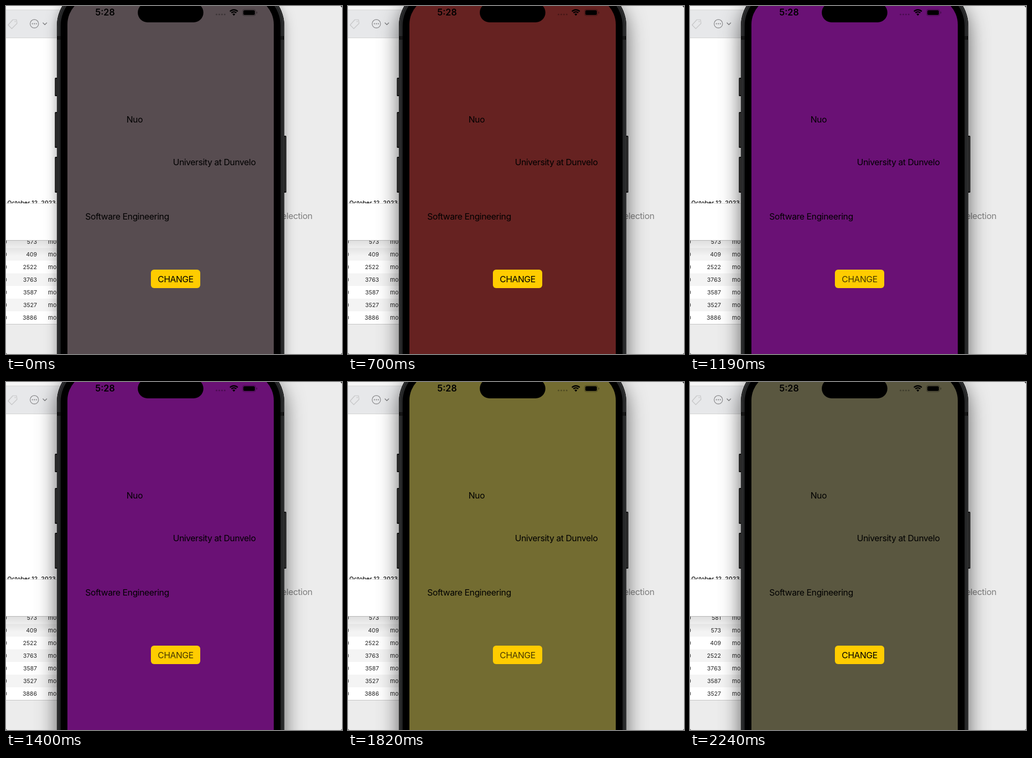
These frames come from a looping animation (640x660 px, 3220 ms). An HTML page with a canvas:

```html
<!DOCTYPE html>
<html lang="en">
<head>
<meta charset="utf-8">
<style>
  html, body { margin: 0; width: 100%; height: 100%; overflow: hidden; }
  canvas { display: block; width: 640px; height: 660px; }
</style>
</head>
<body>
<canvas id="stage" width="640" height="660"></canvas>
<script>
const ctx = document.getElementById('stage').getContext('2d');
const LOOP = 3220, STEP = 70, FADE = 140;
const FOCUS_AT = 420, ROW_ADDED_AT = 1890;
const FIRST_COLOR = '#574c50';
const PRESSED_ALPHA = 0.72;
const FONT = 'Inter, sans-serif';

// Each tap dims the button label; letting go picks a new background.
const taps = [
  { press: 420, release: 490, color: '#662221' },
  { press: 770, release: 840, color: '#6c6825' },
  { press: 1120, release: 1190, color: '#6a1175' },
  { press: 1400, release: 1470, color: '#261721' },
  { press: 1680, release: 1820, color: '#736c31' },
  { press: 1960, release: 2100, color: '#5a5740' }
];
const counts = [581, 573, 409, 2522, 3763, 3587, 3527, 3886];

function rect(x, y, w, h, fill) {
  ctx.fillStyle = fill;
  ctx.fillRect(x, y, w, h);
}

function roundRect(x, y, w, h, r, fill) {
  ctx.beginPath();
  ctx.roundRect(x, y, w, h, r);
  ctx.fillStyle = fill;
  ctx.fill();
}

function label(str, x, y, { size = 16.5, weight = 400, color = '#000', align = 'left', spacing = -0.4 } = {}) {
  ctx.font = `${weight} ${size}px ${FONT}`;
  ctx.letterSpacing = spacing + 'px';
  ctx.textAlign = align;
  ctx.fillStyle = color;
  ctx.fillText(str, x, y);
}

function line(points, color, width) {
  ctx.beginPath();
  points.forEach(([x, y]) => ctx.lineTo(x, y));
  ctx.strokeStyle = color;
  ctx.lineWidth = width;
  ctx.stroke();
}

function circle(x, y, r, fill) {
  ctx.beginPath();
  ctx.arc(x, y, r, 0, Math.PI * 2);
  ctx.fillStyle = fill;
  ctx.fill();
}

function drawToolbar() {
  rect(0, 0, 120, 8, '#f6f6f6');
  rect(0, 7, 120, 1, '#d9d9d9');
  rect(0, 8, 120, 52, '#e7e8ea');
  rect(0, 60, 120, 1, '#d2d2d2');

  ctx.lineJoin = ctx.lineCap = 'round';
  ctx.beginPath();
  ctx.moveTo(13, 26);
  ctx.lineTo(20, 26);
  ctx.lineTo(21, 33);
  ctx.lineTo(11, 43);
  ctx.lineTo(4, 36);
  ctx.closePath();
  ctx.strokeStyle = '#c6c6c7';
  ctx.lineWidth = 1.2;
  ctx.stroke();
  circle(17.5, 29.5, 1.1, '#c6c6c7');

  ctx.beginPath();
  ctx.arc(54, 33.7, 8, 0, Math.PI * 2);
  ctx.strokeStyle = '#858587';
  ctx.lineWidth = 1.2;
  ctx.stroke();
  for (const x of [50.3, 54, 57.7]) circle(x, 33.7, 1.1, '#858587');
  line([[70.5, 32], [74, 35.5], [77.5, 32]], '#858587', 1.6);
}

function drawTable(firstRow) {
  rect(0, 444, 120, 159, '#fff');
  for (let i = 0; i < 7; i++) {
    const y = 435 + i * 24;
    const style = { size: 11, spacing: 0, color: '#262626' };
    if (i % 2) rect(0, y, 120, 24, '#f4f4f4');
    label('0', 2, y + 16, { ...style, align: 'right' });
    label(counts[firstRow + i], 59, y + 16, { ...style, align: 'right' });
    label('mor27', 80, y + 16, style);
  }
  const shade = ctx.createLinearGradient(0, 444, 0, 474);
  shade.addColorStop(0, 'rgba(0,0,0,0.13)');
  shade.addColorStop(1, 'rgba(0,0,0,0)');
  rect(0, 444, 120, 30, shade);
  rect(0, 603, 120, 1, '#c4c4c4');
}

function drawDesktop(t) {
  rect(0, 0, 640, 660, '#ececec');
  rect(0, 61, 120, 383, '#fff');
  drawToolbar();
  label('October 12, 2023', 2.5, 377, { size: 11, weight: 500, spacing: 0.1 });
  drawTable(t < ROW_ADDED_AT ? 1 : 0);
  rect(0, 374, 120, 70, '#fff');
  rect(0, 374, 120, 1, '#dedede');
  rect(0, 444, 120, 1, '#b4b4b4');
  label('No Selection', 583.5, 404, { color: '#7f7f7f', align: 'right' });
}

function drawBody(focused) {
  ctx.save();
  ctx.shadowColor = focused ? 'rgba(0,0,0,0.6)' : 'rgba(0,0,0,0.38)';
  ctx.shadowBlur = focused ? 38 : 21;
  ctx.shadowOffsetY = focused ? 16 : 8;
  roundRect(97, -37, 433, 892, 75, '#000');
  ctx.restore();

  const buttons = [[93, 136, 35], [93, 201, 68], [93, 286, 68], [529, 246, 108]];
  for (const [x, y, h] of buttons) {
    roundRect(x, y, 5, h, 1.5, '#111');
    rect(x + 1, y + 2, 3, h - 4, '#303030');
  }
  roundRect(97, -37, 433, 892, 75, '#080808');
  roundRect(98, -36, 431, 890, 74, '#48494a');
  roundRect(99, -35, 429, 888, 73, '#252627');
  for (const x of [98, 523]) rect(x, 57, 6, 7, '#151515');
  roundRect(104, -30, 419, 878, 68, '#000');
}

function drawStatusBar() {
  label('5:28', 170, 18, { size: 17, weight: 600, spacing: 0 });
  roundRect(251, -6, 125, 37, 18.5, '#000');
  for (let i = 0; i < 4; i++) circle(401 + i * 5.2, 16, 1.6, 'rgba(0,0,0,0.3)');

  ctx.lineCap = 'butt';
  ctx.strokeStyle = '#000';
  ctx.lineWidth = 2.4;
  for (const r of [6.4, 10.3]) {
    ctx.beginPath();
    ctx.arc(434, 17.5, r, -Math.PI * 0.755, -Math.PI * 0.245);
    ctx.stroke();
  }
  ctx.beginPath();
  ctx.moveTo(434, 18.5);
  ctx.arc(434, 18, 3.6, -Math.PI * 0.76, -Math.PI * 0.24);
  ctx.fillStyle = '#000';
  ctx.fill();

  ctx.beginPath();
  ctx.roundRect(450.5, 6.5, 25, 12, 3.8);
  ctx.strokeStyle = 'rgba(0,0,0,0.35)';
  ctx.lineWidth = 1;
  ctx.stroke();
  roundRect(452, 8, 22, 9, 2.5, '#000');
  roundRect(477, 10.5, 1.4, 4, 0.7, 'rgba(0,0,0,0.4)');
}

function buttonState(t) {
  let color = FIRST_COLOR, alpha = 1;
  for (const tap of taps) {
    if (t < tap.press) break;
    alpha = PRESSED_ALPHA;
    if (t >= tap.release) {
      color = tap.color;
      alpha += (1 - PRESSED_ALPHA) * Math.min(1, (t - tap.release) / FADE);
    }
  }
  return { color, alpha };
}

function drawScreen(t) {
  const { color, alpha } = buttonState(t);
  roundRect(117, -17, 393, 852, 52, color);
  drawStatusBar();
  label('Nuo', 229.5, 221);
  label('University at Dunvelo', 318, 302);
  label('Software Engineering', 151, 405);
  roundRect(276, 500, 94, 35, 6, '#ffcc00');
  label('CHANGE', 323, 524, { align: 'center', color: `rgba(0,0,0,${alpha})` });
}

function drawCorners() {
  ctx.beginPath();
  ctx.rect(0, 0, 640, 660);
  ctx.roundRect(0, -10, 640, 670, 3);
  ctx.fillStyle = '#333';
  ctx.fill('evenodd');
  ctx.beginPath();
  ctx.moveTo(637, 0);
  ctx.lineTo(640, 0);
  ctx.lineTo(640, 3);
  ctx.fill();
}

function frame() {
  const t = Math.floor((performance.now() % LOOP) / STEP) * STEP;
  drawDesktop(t);
  drawBody(t >= FOCUS_AT);
  drawScreen(t);
  drawCorners();
  requestAnimationFrame(frame);
}
requestAnimationFrame(frame);
</script>
</body>
</html>
```
